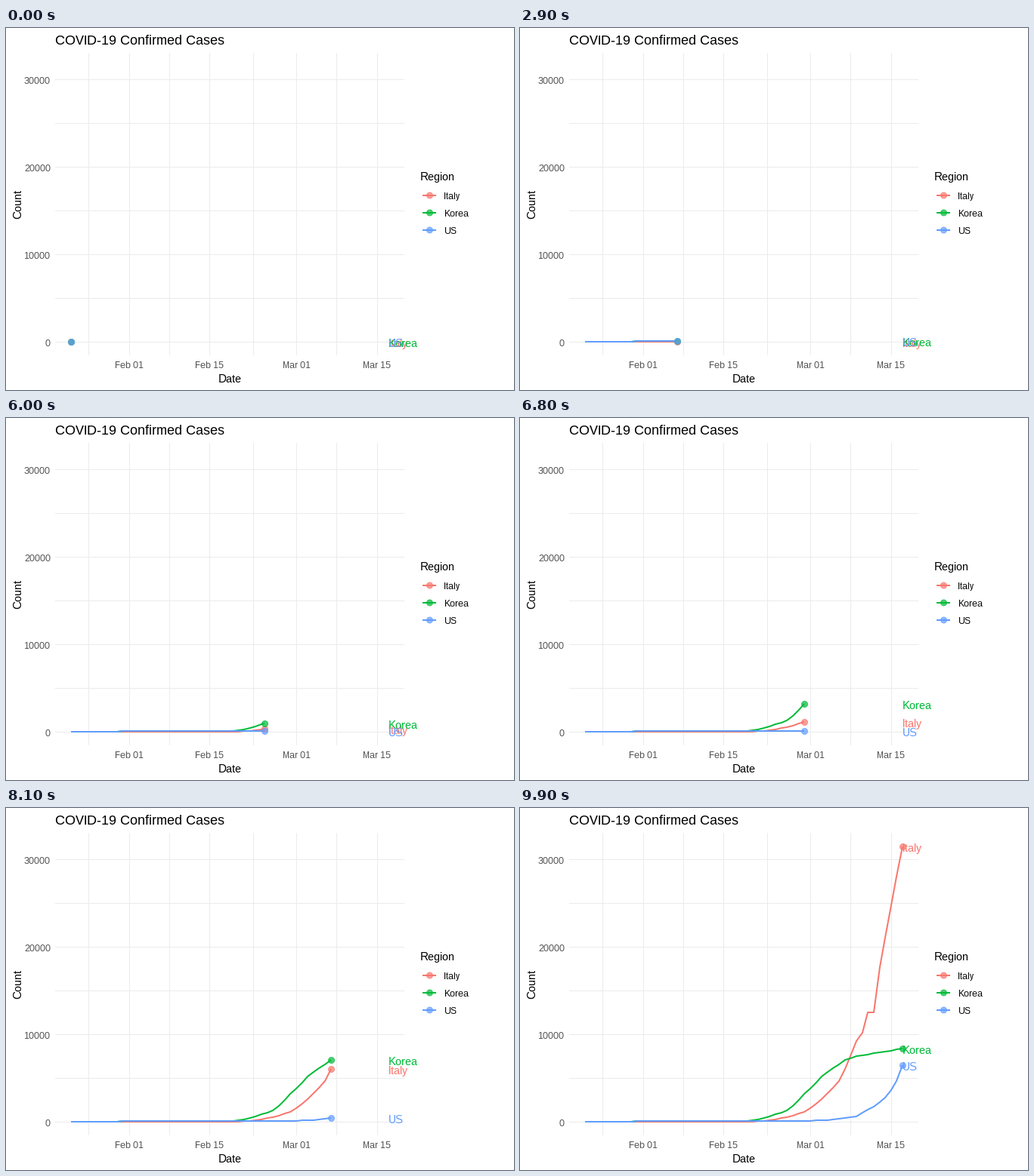
Recreate the animation shown at these times as a matplotlib script. Size 672x480 px, loop 10 s.

```python
import numpy as np
import matplotlib.pyplot as plt
from matplotlib.animation import FuncAnimation
from matplotlib.patches import Circle

plt.rcParams.update({
    "font.family": "Liberation Sans",
    "text.hinting": "native",
    "text.hinting_factor": 1,
})

W, H = 672, 480
FRAMES, INTERVAL = 100, 100
PX = 0.75                      # points per pixel at 96 dpi
X0, DX = 86.7, 7.634           # first day, pixels per day
Y0, DY = 416.07, 0.01158       # zero count, pixels per case
GRID, TICK = "#EBEBEB", "#4D4D4D"
SMALL, MEDIUM, LARGE = 12, 15, 17.6

COLORS = {"Italy": "#F8766D", "Korea": "#00BA38", "US": "#619CFF"}

# (day, cumulative cases) where the growth rate changes
TURNS = {
    "Italy": [(8, 0), (9, 2), (29, 3), (31, 62), (38, 1128), (44, 4636),
              (47, 9172), (48, 10149), (49, 12462), (50, 12462),
              (51, 17660), (53, 24747), (55, 31506)],
    "Korea": [(0, 1), (8, 4), (9, 11), (28, 31), (31, 433), (35, 1261),
              (38, 3150), (41, 5186), (45, 7041), (47, 7478), (55, 8320)],
    "US": [(0, 1), (8, 5), (9, 7), (32, 15), (38, 68), (42, 149), (47, 583),
           (48, 959), (52, 2727), (54, 4632), (55, 6421)],
}
DAYS = np.arange(56)
# Each day lands on a whole frame; values are linear in between
DAY_FRAMES = np.round(DAYS * (FRAMES - 1) / DAYS[-1])


def growth(turns):
    """Daily counts whose square root is linear between turns."""
    day, count = np.transpose(turns)
    return np.interp(DAYS, day, np.sqrt(count)) ** 2


CASES = {name: growth(turns) for name, turns in TURNS.items()}


def px(day):
    return np.floor(X0 + DX * np.asarray(day, float))


def py(count):
    return np.floor(Y0 - DY * np.asarray(count, float))


fig = plt.figure(figsize=(W / 96, H / 96), dpi=96, facecolor="white")
ax = fig.add_axes([0, 0, 1, 1])
ax.set(xlim=(0, W), ylim=(H, 0))
ax.axis("off")


def text(x, y, s, size, color="black", ha="left", va="baseline", **kw):
    return ax.text(x, y, s, fontsize=size * PX, color=color, ha=ha, va=va, **kw)


def stroke(xs, ys, color, width=2, z=2):
    return ax.plot(xs, ys, color=color, lw=width * PX, snap=False, zorder=z,
                   solid_capstyle="butt", solid_joinstyle="round")[0]


def dot(x, y, color):
    return ax.add_patch(Circle((x + 0.5, y + 0.5), 4, color=color, lw=PX,
                               alpha=0.7, zorder=3))


# Grid
for count in range(0, 30001, 5000):
    y = py(count) + 0.5
    stroke([65, 527], [y, y], GRID, 1, 1)
    if count % 10000 == 0:
        text(59, y + 5.5, str(count), SMALL, TICK, "right")

for day in (3, 10, 17, 24, 31.5, 39, 46, 53):
    x = px(day) + 0.5
    stroke([x, x], [33, 434], GRID, 1, 1)

for day, label in ((10, "Feb 01"), (24, "Feb 15"), (39, "Mar 01"), (53, "Mar 15")):
    text(px(day), 451, label, SMALL, TICK, "center")

# Titles
text(65, 22, "COVID-19 Confirmed Cases", LARGE)
text(296, 470, "Date", MEDIUM, ha="center")
text(23, 233.5, "Count", MEDIUM, ha="right", va="center", rotation=90)

# Legend
text(548, 202, "Region", MEDIUM)
for i, (name, color) in enumerate(COLORS.items()):
    y = 222 + 23 * i
    stroke([551, 569], [y, y], color)
    dot(560, y - 0.5, color)
    text(579, y + 5, name, SMALL)

# Moving parts
lines = {n: stroke([], [], c) for n, c in COLORS.items()}
dots = {n: dot(0, 0, c) for n, c in COLORS.items()}
labels = {n: text(506, 0, n, MEDIUM, c, zorder=4) for n, c in COLORS.items()}


def update(frame):
    now = np.interp(frame, DAY_FRAMES, DAYS)
    days = np.append(DAYS[DAYS < now], now)
    for name, cases in CASES.items():
        xs, ys = px(days), py(np.interp(days, DAYS, cases))
        lines[name].set_data(xs, ys)
        dots[name].center = xs[-1] + 0.5, ys[-1] + 0.5
        labels[name].set_y(ys[-1] + 7)
    return [*lines.values(), *dots.values(), *labels.values()]


anim = FuncAnimation(fig, update, frames=FRAMES, interval=INTERVAL,
                     repeat=True, repeat_delay=0, blit=False)
plt.show()
```
